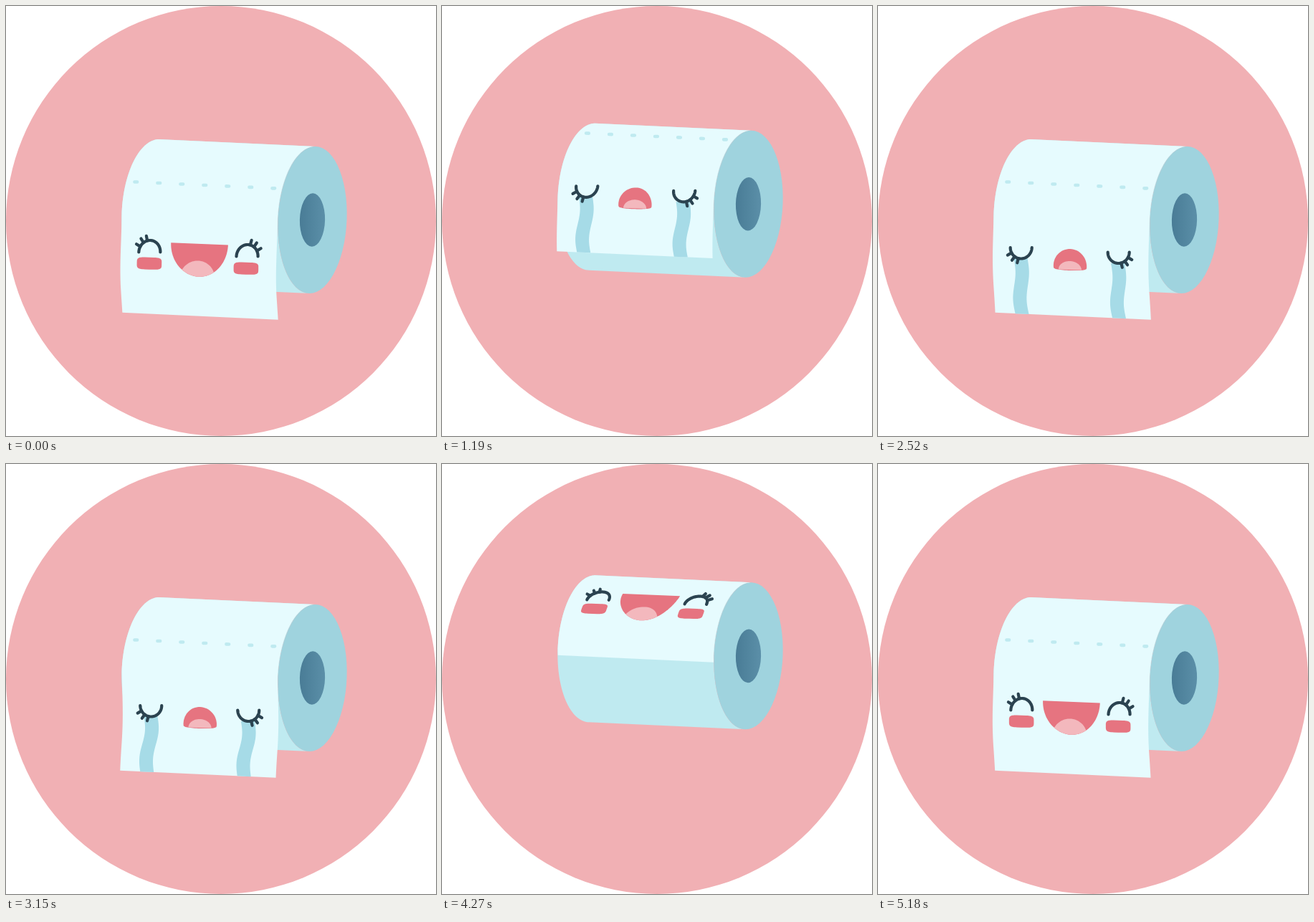
Recreate the animation shown at these times as an HTML page with a canvas. Size 600 by 600 pixels, loop 5250 ms.

```html
<!DOCTYPE html>
<html lang="en">
<head>
<meta charset="utf-8">
<title>Moody paper roll</title>
<style>
  html, body { margin: 0; width: 100%; height: 100%; overflow: hidden; background: #fff; }
  canvas { display: block; }
</style>
</head>
<body>
<canvas id="stage" width="600" height="600"></canvas>
<script>
const ctx = document.getElementById('stage').getContext('2d');
const { PI, sin, cos, min, max, abs, sign, sqrt, floor } = Math;
const LOOP = 5250, STEP = 70, TURN = 3150, SWAP = 850;
const LEFT = 161.5, RIGHT = 379.5, RX = 48, RY = 102.5, LEAN = 4;
const QUARTER = RY * PI / 2, HANG = 139.3, WOUND = 315;
const INK = '#2b4350', RED = '#e67480', PINK = '#f3b8bd', PAPER = '#e6fbfe',
      UNDER = '#bfeaf0', RIM = '#9fd3de', TEAR = '#a6dbe7';

let wind, lift, phase, slack;

const clamp = v => max(0, min(1, v));
const back = s => s * s * (2.5 * s - 1.5); // swings back before it goes
const range = (n, f) => Array.from({ length: n + 1 }, (_, i) => f(i / n));
const arc = (from, to, f) => range(60, p => f(from + (to - from) * p));
const bulge = (v, power) => sign(v) * abs(v) ** power;

const axisY = x => 288.5 + (x - LEFT) * 10 / (RIGHT - LEFT);

// Point on the roll: x along it, angle from the top towards the viewer
const onRoll = (x, a) => [x + RX * (1 - sin(a)) + LEAN * cos(a), axisY(x) + lift - RY * cos(a)];

// Point on the sheet, given where it would lie if it hung flat
function onSheet([x, y]) {
  const v = QUARTER + y - axisY(x) - wind, d = v - QUARTER;
  if (d <= 0) return [...onRoll(x, max(0, v / RY)), v < 0];
  const sway = slack / 10 + 2.8 * sin(phase - d / 42);
  return [x + min(1, d / 100) * sway, axisY(x) + lift + d, false];
}

function fill(points, color) {
  ctx.beginPath();
  points.forEach(([x, y]) => ctx.lineTo(x, y));
  ctx.fillStyle = color;
  ctx.fill();
}

const patch = (color, points) => fill(points.map(onSheet), color);

function stroke(color, width, points) {
  ctx.beginPath();
  let down = false;
  for (const [x, y, hidden] of points.map(onSheet)) {
    if (!hidden) down ? ctx.lineTo(x, y) : ctx.moveTo(x, y);
    down = !hidden;
  }
  ctx.strokeStyle = color;
  ctx.lineWidth = width;
  ctx.lineCap = ctx.lineJoin = 'round';
  ctx.stroke();
}

// Half-ellipse lid with three lashes on its outer side; negative height hangs down
function eye(cx, cy, height, side) {
  const at = (a, r = 1) => [cx + side * 15 * r * cos(a), cy - height * r * sin(a)];
  stroke(INK, 4.2, arc(0, PI, a => at(a)));
  for (const a of [0.5, 0.94, 1.32]) stroke(INK, 4.2, [at(a), at(a, 1.42)]);
}

const cheek = (cx, cy) => patch(RED, arc(0, 2 * PI, a => {
  const dx = 17.3 * bulge(cos(a), 0.45);
  return [cx + dx, cy + 8.5 * bulge(sin(a), 0.45) + dx * 0.03];
}));

function happyFace() {
  const k = 1 + slack * 0.006, cx = 271, half = 39.8;
  const lip = x => 331.8 + (x - cx) * 0.04;
  const chin = x => lip(x) + 46 * k * sqrt(max(0, 1 - ((x - cx) / half) ** 2));
  patch(RED, arc(0, PI, a => {
    const x = cx + half * cos(a);
    return [x, chin(x)];
  }));
  patch(PINK, arc(0, 2 * PI, a => {
    const x = cx - 2 + 24 * cos(a);
    return [x, min(chin(x), 332 + 46.5 * k - 23 * sin(a))];
  }));
  eye(201.8, 343.5, 16.5 * k, -1);
  eye(338, 349.5, 16.5 * k, 1);
  cheek(201.8, 359.2);
  cheek(336.8, 366.2);
}

// Wavy ribbon from the eye to the end of the sheet
function tear(cx, top) {
  const side = dx => p => [cx + dx - 1.5 * p + 2.4 * sin(p * 2 * PI),
                           top + (axisY(cx + dx) + HANG - top) * p];
  patch(TEAR, [...range(30, side(-9.5)), ...range(30, side(9.5)).reverse()]);
}

function sadFace() {
  tear(200.5, 352);
  tear(336, 359);
  patch(RED, arc(0, 2 * PI, a => {
    const dx = 23.2 * cos(a), s = sin(a);
    return [269.5 + dx, 363 + dx * 0.03 - (s > 0 ? 24 * s : 6 * bulge(s, 0.4))];
  }));
  patch(PINK, arc(0, PI, a => [269.3 + 16 * cos(a), 368 + 0.5 * cos(a) - 12 * sin(a)]));
  eye(201, 337, -15.5, -1);
  eye(337, 343.5, -15.5, 1);
}

function drawRoll() {
  fill([...arc(0, PI, a => onRoll(LEFT, a)), ...arc(PI, 0, a => onRoll(RIGHT, a))], UNDER);
  fill(arc(0, 2 * PI, a => onRoll(RIGHT, a)), RIM);
  const hole = ctx.createLinearGradient(410, 0, 445, 0);
  hole.addColorStop(0, '#497c96');
  hole.addColorStop(1, '#5b8fa8');
  ctx.beginPath();
  ctx.ellipse(427.5, 298.5 + lift, 17.6, 37.3, 0.02, 0, 2 * PI);
  ctx.fillStyle = hole;
  ctx.fill();
}

function drawSheet(face) {
  const length = QUARTER + HANG - wind;
  if (length <= 0) return;
  const edge = x => range(70, p => [x, axisY(x) + HANG - length * (1 - p)]);
  patch(PAPER, [...edge(LEFT), ...edge(RIGHT - 0.7).reverse()]);
  for (let x = 175; x < RIGHT; x += 32) {
    const y = axisY(x) - 45;
    stroke(UNDER, 4.6, [[x - 1.8, y], [x + 1.8, y]]);
  }
  face();
}

function frame(now) {
  const t = floor(now % LOOP / STEP) * STEP;
  const second = t >= TURN, local = t % TURN, turned = local > SWAP;

  // Wind up, change mood out of sight, unwind with an overshoot
  wind = WOUND * back(clamp(turned ? (1760 - local) / 765 : (local - 140) / 585));
  slack = max(0, -wind);
  lift = slack * 0.17 - 40 * sqrt(sin(PI * clamp((local - 560) / 700)) + 1e-9);
  phase = t / LOOP * 8 * PI - 0.14;

  ctx.fillStyle = '#fff';
  ctx.fillRect(0, 0, 600, 600);
  ctx.beginPath();
  ctx.arc(300, 300, 300, 0, 2 * PI);
  ctx.fillStyle = '#f1b0b4';
  ctx.fill();
  drawRoll();
  drawSheet(turned !== second ? sadFace : happyFace);
}

const begin = performance.now();
(function loop() {
  frame(performance.now() - begin);
  requestAnimationFrame(loop);
})();
</script>
</body>
</html>
```
